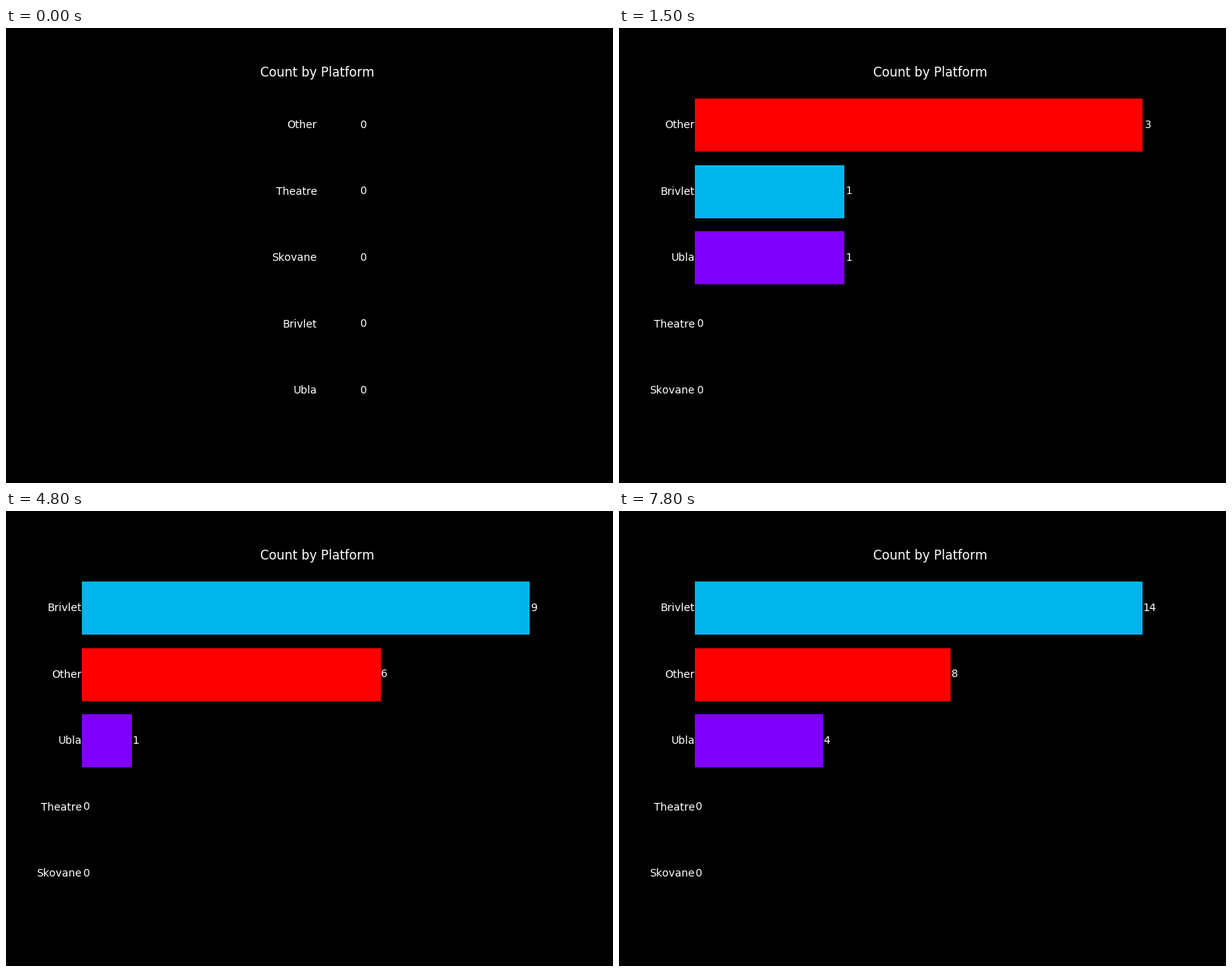
Write a matplotlib script that moves like this. It is 800x600 px and loops after 8000 ms.

```python
import numpy as np
import matplotlib.pyplot as plt
from matplotlib.animation import FuncAnimation

plt.rcParams.update({"font.family": "DejaVu Sans", "text.kerning_factor": 6})

# Bottom to top in the starting order; each letter of EVENTS adds one.
PLATFORMS = {"U": "Ubla", "B": "Brivlet", "S": "Skovane", "T": "Theatre", "O": "Other"}
EVENTS = "OBUOO" "BBOB" "OBOB" "BBBOBUB" "BOUBUB"
KEYS = list(PLATFORMS)
COLORS = dict(zip(KEYS, plt.cm.rainbow(np.linspace(0, 1, len(KEYS)))))
LABEL_GAP = 0.01
NUDGE = 0.003  # keeps text off half-pixel rows
TICK_MS = 100
TICKS_PER_EVENT = 3
LOOP_MS = 8000

fig, ax = plt.subplots(figsize=(8, 6), dpi=100, facecolor="black")


def draw(tick):
    ax.clear()
    ax.axis("off")
    ax.set_title("Count by Platform", color="white")

    seen = EVENTS[:tick // TICKS_PER_EVENT]
    ranking = sorted(KEYS, key=seen.count)
    counts = [seen.count(key) for key in ranking]
    ax.barh(range(len(KEYS)), counts, color=[COLORS[key] for key in ranking])

    for row, (key, count) in enumerate(zip(ranking, counts)):
        ax.text(0, row - NUDGE, PLATFORMS[key], color="white", ha="right", va="center")
        ax.text(count + LABEL_GAP, row + NUDGE, str(count), color="white", va="center")


anim = FuncAnimation(fig, draw, frames=LOOP_MS // TICK_MS, init_func=lambda: None,
                     interval=TICK_MS, repeat=True, repeat_delay=0)
plt.show()
```
